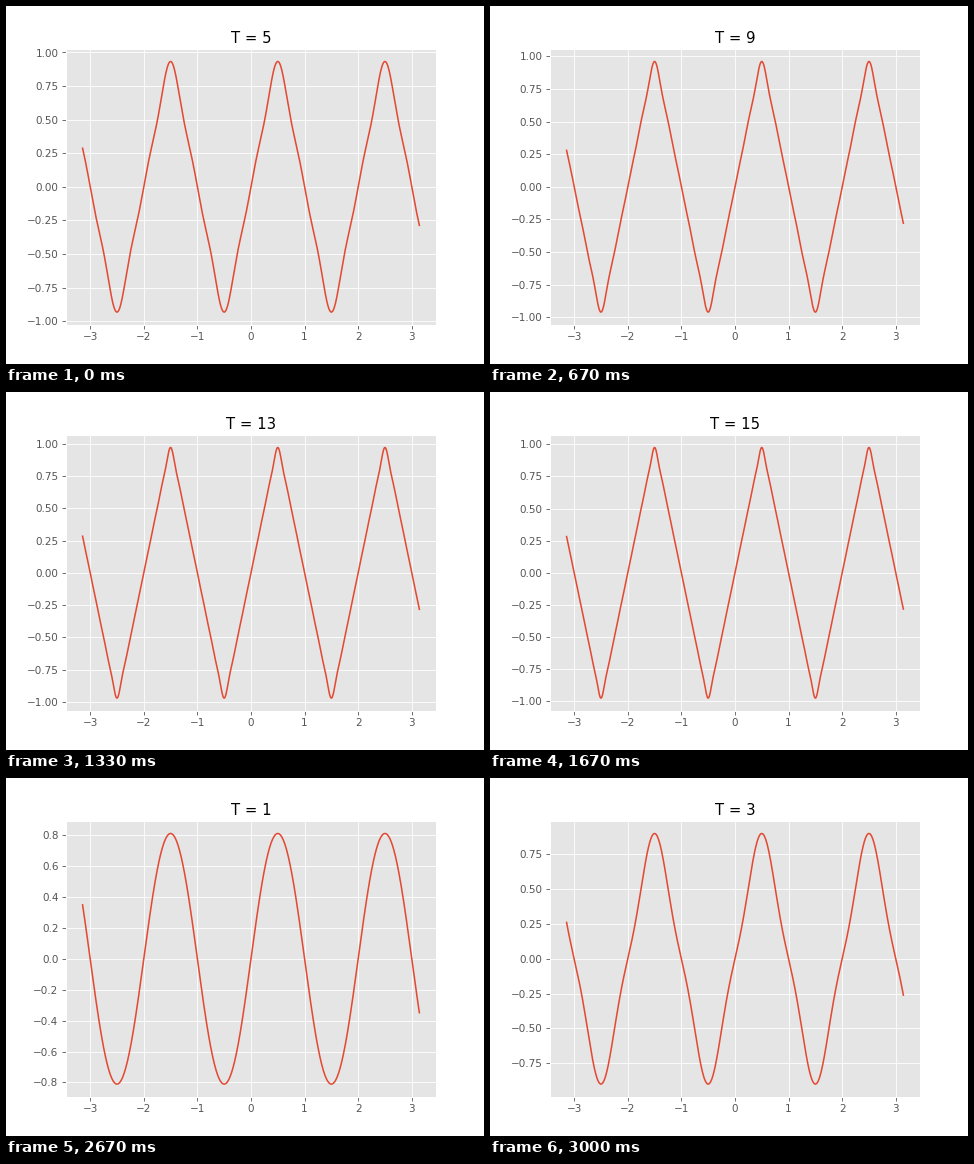
These frames come from a looping animation (478x358 px, 3340 ms). A matplotlib script:

```python
import numpy as np
import matplotlib.pyplot as plt
from matplotlib.animation import FuncAnimation

WIDTH, HEIGHT, DPI = 478, 358, 74.6875
LOOP_MS, STEP_MS = 3340, 20
ORDERS = [5, 7, 9, 11, 13, 15, 17, 19, 1, 3]
GREY = "#555555"

plt.rcParams.update({
    "font.family": "DejaVu Sans",
    "font.size": 10,
    "axes.facecolor": "#E5E5E5",
    "axes.edgecolor": "white",
    "axes.linewidth": 1,
    "axes.grid": True,
    "axes.axisbelow": True,
    "axes.titlesize": "x-large",
    "grid.color": "white",
    "grid.linestyle": "-",
    "xtick.color": GREY,
    "ytick.color": GREY,
    "figure.facecolor": "white",
})


def triangle_sum(x, order):
    """Fourier sum of a triangle wave with odd harmonics up to order."""
    n = np.arange(1, order + 1, 2)[:, None]
    signs = (-1.0) ** (n // 2)
    return 8 / np.pi**2 * np.sum(signs * np.sin(n * np.pi * x) / n**2, axis=0)


x = np.linspace(-np.pi, np.pi, 1000)
curves = {order: triangle_sum(x, order) for order in ORDERS}

# The tiny surplus keeps the pixel size from rounding down.
fig, ax = plt.subplots(
    figsize=((WIDTH + 0.001) / DPI, (HEIGHT + 0.001) / DPI), dpi=DPI
)
line, = ax.plot(x, curves[ORDERS[0]], color="#E24A33", lw=1.5)
title = ax.set_title("")


def update(i):
    middle = (i + 0.5) * STEP_MS
    stage = int(middle / LOOP_MS * len(ORDERS) + 0.05) % len(ORDERS)
    order = ORDERS[min(stage, len(ORDERS) - 1)] if middle < LOOP_MS - STEP_MS else ORDERS[-1]
    y = curves[order]
    line.set_ydata(y)
    limit = 1.1 * y.max()
    ax.set_ylim(-limit, limit)
    title.set_text(f"T = {order}")
    return line, title


anim = FuncAnimation(fig, update, frames=LOOP_MS // STEP_MS, interval=STEP_MS,
                     repeat=True, repeat_delay=0, blit=False)
plt.show()
```
